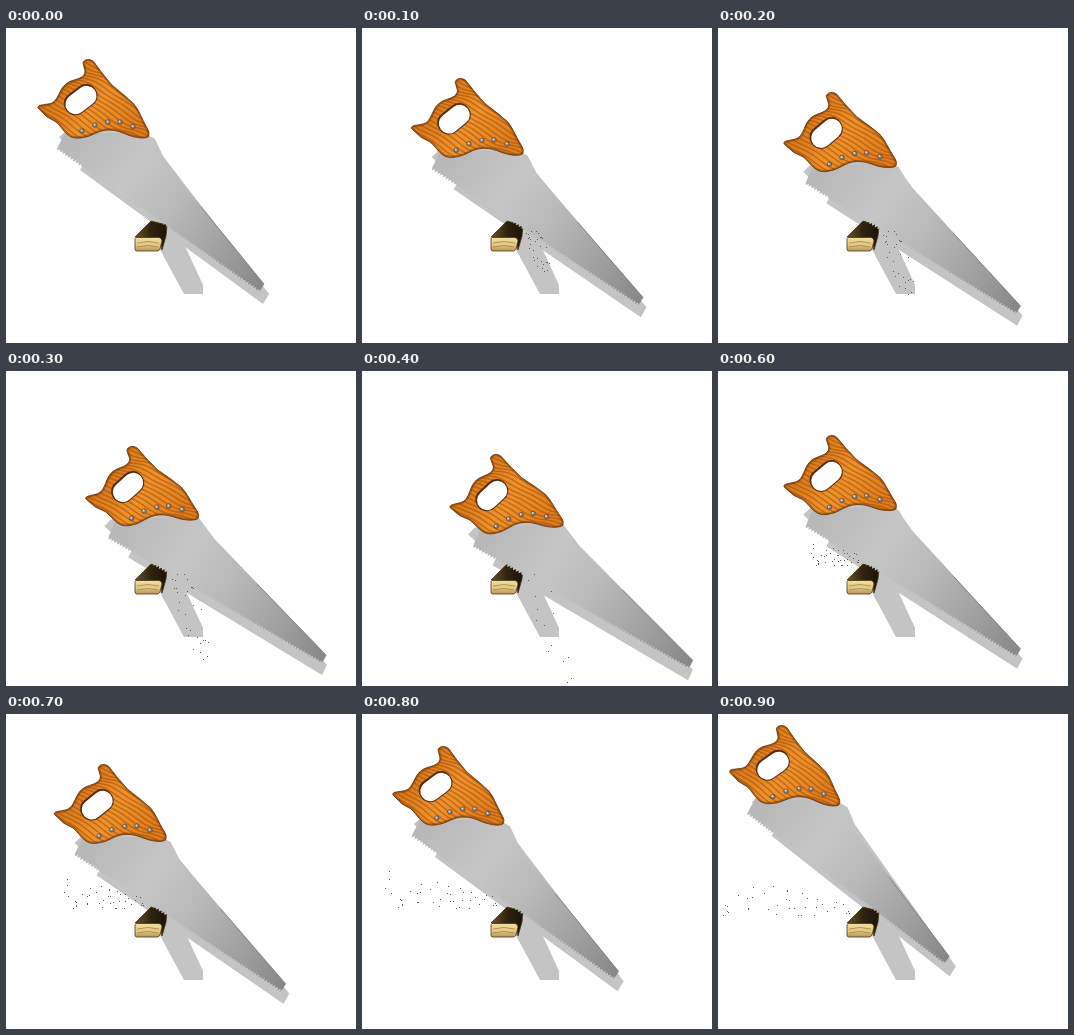
An HTML page that plays this animation: 350x315 px, repeating every 1000 ms.

```html
<!DOCTYPE html>
<html lang="en">
<head>
<meta charset="utf-8">
<title>Hand saw</title>
<style>
html, body { margin: 0; width: 100%; height: 100%; overflow: hidden; background: #fff; }
svg { display: block; width: 100vw; height: 100vh; }
</style>
</head>
<body>
<svg viewBox="0 0 350 315">
  <defs>
    <linearGradient id="steel" gradientUnits="userSpaceOnUse" x1="65" y1="115" x2="256" y2="262">
      <stop offset="0" stop-color="#b8b8b8"/>
      <stop offset=".28" stop-color="#c6c6c6"/>
      <stop offset=".5" stop-color="#b9b9b9"/>
      <stop offset=".78" stop-color="#9e9e9e"/>
      <stop offset="1" stop-color="#868686"/>
    </linearGradient>
    <linearGradient id="varnish" gradientUnits="userSpaceOnUse" x1="50" y1="60" x2="118" y2="112">
      <stop offset="0" stop-color="#d87617"/>
      <stop offset=".5" stop-color="#f0922a"/>
      <stop offset="1" stop-color="#e07d1c"/>
    </linearGradient>
    <linearGradient id="bark" x1="0" y1="0" x2="1" y2="0">
      <stop offset="0" stop-color="#67512a"/>
      <stop offset=".5" stop-color="#30240f"/>
      <stop offset="1" stop-color="#1a1308"/>
    </linearGradient>
    <linearGradient id="cut" x1="0" y1="0" x2="0" y2="1">
      <stop offset="0" stop-color="#f2dfa0"/>
      <stop offset=".55" stop-color="#e3c885"/>
      <stop offset="1" stop-color="#b8975a"/>
    </linearGradient>
    <path id="grip" d="M77 35C78 31 84 30 88 34L96 45L106 57L118 67L128 76C133 82 136 91 140 98C143 103 144 106 142 109C138 111 130 110 122 107C115 104 110 102 103 102C92 102 85 109 77 109.500C70 111 65 110 61 106C57 103 54 97 50 94L41 89L32 80C31 77 36 77 42 76C49 75 50 71 53 66C57 57 61 54 68 52C75 50 79 48 79 43Z"/>
    <clipPath id="gripClip"><use href="#grip"/></clipPath>
  </defs>
  <path fill="#c4c4c4" d="M151 216L162 199L173 205L179 218L197 257V266L178 266Z"/>
  <g id="shade" fill="#c4c4c4">
    <path d="M60 103L53 109L61 118L85 125L74 142L257 276L263 266L157 128L149 111L130 100Z"/>
  </g>
  <g stroke="#4a3515" stroke-width=".8" stroke-linejoin="round">
    <path fill="url(#bark)" d="M129 209L145 193L161 197L160 208L156 222L154 211Z"/>
    <path fill="url(#cut)" d="M130 209.500H153Q156 210 156 213L154 221Q153 223 151 223H131Q129 223 129 221V212Q129 210 130 209.500Z"/>
    <path fill="none" stroke="#a78542" d="M131 215Q142 212 153 215M131 219Q142 216 152 219"/>
  </g>
  <g id="saw">
    <path id="blade" fill="url(#steel)"/>
    <path fill="none" stroke="#777" stroke-width=".7" d="M195 179L258 256L254 262"/>
    <use href="#grip" fill="url(#varnish)"/>
    <g clip-path="url(#gripClip)">
      <path id="grain" fill="none" stroke="#94480c" stroke-opacity=".5" stroke-width="1.500"/>
      <use href="#grip" fill="none" stroke="#5c2b06" stroke-opacity=".4" stroke-width="3.500"/>
    </g>
    <use href="#grip" fill="none" stroke="#5a2a08" stroke-width=".7"/>
    <g transform="translate(75 72) rotate(-37)">
      <rect x="-18" y="-12" width="36" height="23" rx="11" fill="#54280a"/>
      <rect x="-17" y="-10" width="34" height="20" rx="10" fill="#fff"/>
    </g>
    <g id="screws"></g>
  </g>
  <path id="dust" fill="#625d53" shape-rendering="crispEdges"/>
</svg>
<script>
const $ = id => document.getElementById(id);
const STEP = 100, PIVOT = [82, 31];
// Top of the handle at each step of the stroke
const stroke = [[82, 31], [98, 50], [113, 64], [125.5, 75], [133, 83],
                [126.5, 77], [113, 64], [97, 50], [81, 32], [63.5, 11]];

function random(seed) {
  return () => (seed = (seed * 16807) % 2147483647) / 2147483647;
}

function bladePath() {
  const n = 76, a = [51.5, 119.5], b = [253, 261];
  let d = 'M59 105';
  for (let i = 0; i <= n; i++) {
    const x = a[0] + (b[0] - a[0]) * i / n, y = a[1] + (b[1] - a[1]) * i / n;
    d += `L${x.toFixed(1)} ${y.toFixed(1)}l-.4 2.800`;
  }
  return d + 'L258 256L157 131L141 105Z';
}

function grainPath() {
  let d = '';
  for (let i = 0; i < 28; i++) {
    const y = -20 + i * 4.8;
    for (let x = 28; x <= 148; x += 4) {
      const wave = 2.5 * Math.sin(x / 13 + i * .4) + Math.sin(x / 6 + i);
      d += `${x === 28 ? 'M' : 'L'}${x} ${(y + (x - 28) * .55 + wave).toFixed(1)}`;
    }
  }
  return d;
}

function dustPath(step) {
  const forward = step >= 1 && step <= 4, back = step >= 6;
  if (!forward && !back) return '';
  const rnd = random(forward ? 421 : 977);
  const age = forward ? step : step - 5;
  const count = forward ? (age === 4 ? 14 : 30) : 42;
  let d = '';
  for (let i = 0; i < count; i++) {
    const u = rnd(), v = rnd();
    let x, y;
    if (forward) {
      const fall = u ** 1.3 * (18 + 23 * age);
      x = 162 + fall * .27 + v * (15 + 3 * age);
      y = 203 + fall;
    } else {
      const far = u * (15 + 32 * age);
      x = 143 - 3 * age - far;
      y = 191 + (v - .65) * (12 + far * .25) - far * .1 + (age === 4 ? 8 : 0);
    }
    d += `M${Math.round(x)} ${Math.round(y)}h1v1h-1z`;
  }
  return d;
}

$('blade').setAttribute('d', bladePath());
$('grain').setAttribute('d', grainPath());
$('screws').innerHTML = [[76, 103], [89, 97], [102, 94], [114, 94], [127, 98.5]].map(([x, y]) =>
  `<circle cx="${x}" cy="${y}" r="2.300" fill="#7d8790" stroke="#5b3510" stroke-width=".6"/>` +
  `<circle cx="${x - .5}" cy="${y - .6}" r="1" fill="#d5dde2"/>`).join('');

function draw(step) {
  const [x, y] = stroke[step];
  const angle = (PIVOT[0] - x) * .113;
  const pose = dx => `translate(${x - PIVOT[0] + dx} ${y - PIVOT[1]}) rotate(${angle} ${PIVOT})`;
  $('saw').setAttribute('transform', pose(0));
  $('shade').setAttribute('transform', pose(angle));
  $('dust').setAttribute('d', dustPath(step));
}

let shown = -1;
function tick() {
  const step = Math.floor(performance.now() / STEP) % stroke.length;
  if (step !== shown) draw(shown = step);
  requestAnimationFrame(tick);
}
tick();
</script>
</body>
</html>
```
